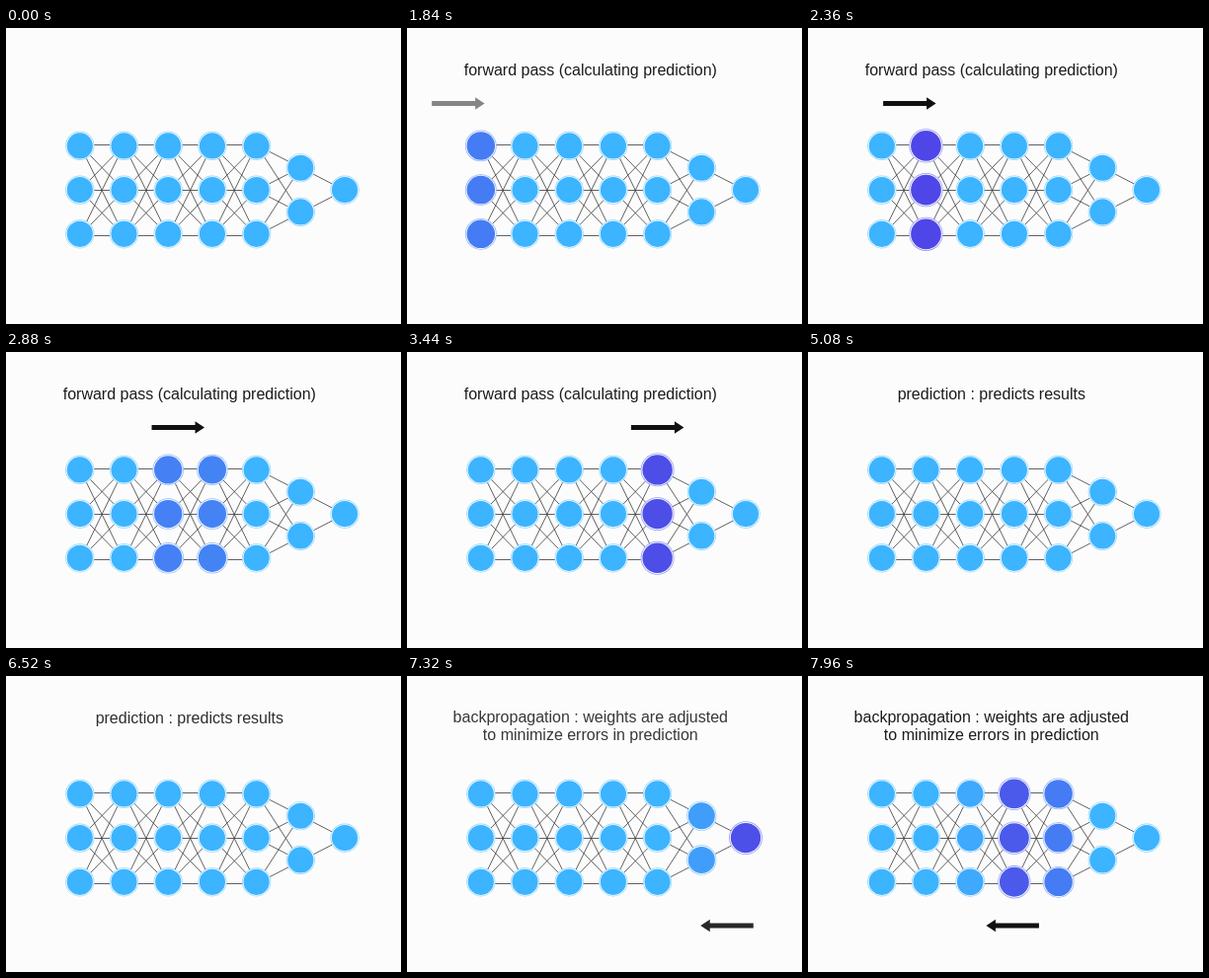
Write an HTML page with a canvas that moves like this. It is 400 by 300 pixels and loops after 8 s.

```html
<!DOCTYPE html>
<html lang="en">
<head>
<meta charset="utf-8">
<title>Neural network passes</title>
<style>
html, body { margin: 0; width: 400px; height: 300px; overflow: hidden; background: #fcfcfc; }
canvas { display: block; width: 400px; height: 300px; }
</style>
</head>
<body>
<canvas id="stage" width="400" height="300"></canvas>
<script>
const ctx = document.getElementById('stage').getContext('2d');
const LOOP = 8000, STEP = 40, FADE = 320;
const CALM = [60, 180, 255], HOT = [79, 68, 230];

// Rows of each layer, in row heights from the middle
const three = [-1, 0, 1];
const layers = [three, three, three, three, three, [-0.5, 0.5], [0]];
const layerX = i => 74.8 + 44.7 * i;

const captions = [
  { in: 1200, out: 3900, y: 48, lines: ['forward pass (calculating prediction)'] },
  { in: 4440, out: 6480, y: 47.5, lines: ['prediction : predicts results'] },
  { in: 6900, out: 9200, y: 46.5, lines: ['backpropagation : weights are adjusted', 'to minimize errors in prediction'] }
];

// first: when the first layer peaks, gap: time between layers
const passes = [
  { start: 1680, end: 4440, first: 2000, gap: 353, from: 15, to: 331, y: 76.5, dir: 1 },
  { start: 7032, end: 9016, first: 7352, gap: 224, from: 380, to: 64, y: 253, dir: -1 }
];

const clamp = v => Math.max(0, Math.min(1, v));
const mix = (a, b, p) => a + (b - a) * p;
const window01 = (t, on, off, length) =>
  Math.min(clamp((t - on) / length), 1 - clamp((t - off) / length));

// Arrow travel: slow, steady, slow (smooth curve through a few points)
const path = [[0, 0], [.058, .032], [.13, .08], [.246, .193], [.638, .671], [.942, .975], [1, 1]];
const chord = i => (path[i + 1][1] - path[i][1]) / (path[i + 1][0] - path[i][0]);
const slope = path.map((p, i) => {
  if (i === 0) return .55;
  if (i === path.length - 1) return .3;
  const before = p[0] - path[i - 1][0], after = path[i + 1][0] - p[0];
  return (chord(i - 1) * after + chord(i) * before) / (before + after);
});
function travel(u) {
  u = clamp(u);
  let i = 0;
  while (i < path.length - 2 && u > path[i + 1][0]) i++;
  const [x0, y0] = path[i], [x1, y1] = path[i + 1];
  const h = x1 - x0, s = (u - x0) / h, r = 1 - s;
  return y0 * (1 + 2 * s) * r * r + y1 * s * s * (3 - 2 * s)
    + h * s * r * (slope[i] * r - slope[i + 1] * s);
}

function heat(layer, t) {
  return Math.max(...passes.map(p => {
    const order = p.dir > 0 ? layer : layers.length - 1 - layer;
    return clamp(1 - Math.abs(t - p.first - order * p.gap) / FADE);
  }));
}

function drawEdges() {
  ctx.strokeStyle = '#3a3a3a';
  ctx.lineWidth = .8;
  ctx.beginPath();
  for (let i = 0; i < layers.length - 1; i++)
    for (const a of layers[i])
      for (const b of layers[i + 1]) {
        ctx.moveTo(layerX(i), 164.5 + 46 * a);
        ctx.lineTo(layerX(i + 1), 164.5 + 46 * b);
      }
  ctx.stroke();
}

function disc(x, y, r, fill) {
  ctx.fillStyle = fill;
  ctx.beginPath();
  ctx.arc(x, y, r, 0, 2 * Math.PI);
  ctx.fill();
}

function drawNodes(t) {
  layers.forEach((rows, i) => {
    const p = heat(i, t);
    const rgb = CALM.map((c, k) => Math.round(mix(c, HOT[k], p))).join();
    for (const row of rows) {
      const x = layerX(i), y = 164.1 + 44.7 * row;
      disc(x, y, mix(14.6, 17.2, p), '#fcfcfc');
      disc(x, y, mix(14.6, 17.2, p), `rgba(${rgb},.55)`);
      disc(x, y, mix(13.9, 16.4, p), '#f4faff');
      disc(x, y, mix(13.1, 15.4, p), `rgb(${rgb})`);
    }
  });
}

function drawArrow(p, t) {
  const alpha = window01(t, p.start, p.end - FADE, FADE);
  if (!alpha) return;
  ctx.save();
  ctx.globalAlpha = alpha;
  ctx.translate(mix(p.from, p.to, travel((t - p.start) / (p.end - p.start))), p.y);
  ctx.scale(p.dir, 1);
  ctx.fillStyle = '#111';
  ctx.beginPath();
  for (const [x, y] of [[0, -2.5], [44, -2.5], [44, -6.3], [53.5, 0], [44, 6.3], [44, 2.5], [0, 2.5]])
    ctx.lineTo(x, y);
  ctx.fill();
  ctx.restore();
}

function drawCaption(c, t) {
  ctx.globalAlpha = window01(t, c.in, c.out, 480);
  ctx.fillStyle = '#1c1c1c';
  ctx.font = '16px "Liberation Sans", Arial, sans-serif';
  ctx.textAlign = 'center';
  c.lines.forEach((line, i) => ctx.fillText(line, 185.8, c.y + 18 * i));
  ctx.globalAlpha = 1;
}

function draw(now) {
  const t = Math.floor((now % LOOP) / STEP) * STEP;
  ctx.fillStyle = '#fcfcfc';
  ctx.fillRect(0, 0, 400, 300);
  drawEdges();
  drawNodes(t);
  passes.forEach(p => drawArrow(p, t));
  captions.forEach(c => drawCaption(c, t));
}

let begin;
function tick(now) {
  begin ??= now;
  draw(now - begin);
  requestAnimationFrame(tick);
}
draw(0);
requestAnimationFrame(tick);
</script>
</body>
</html>
```
